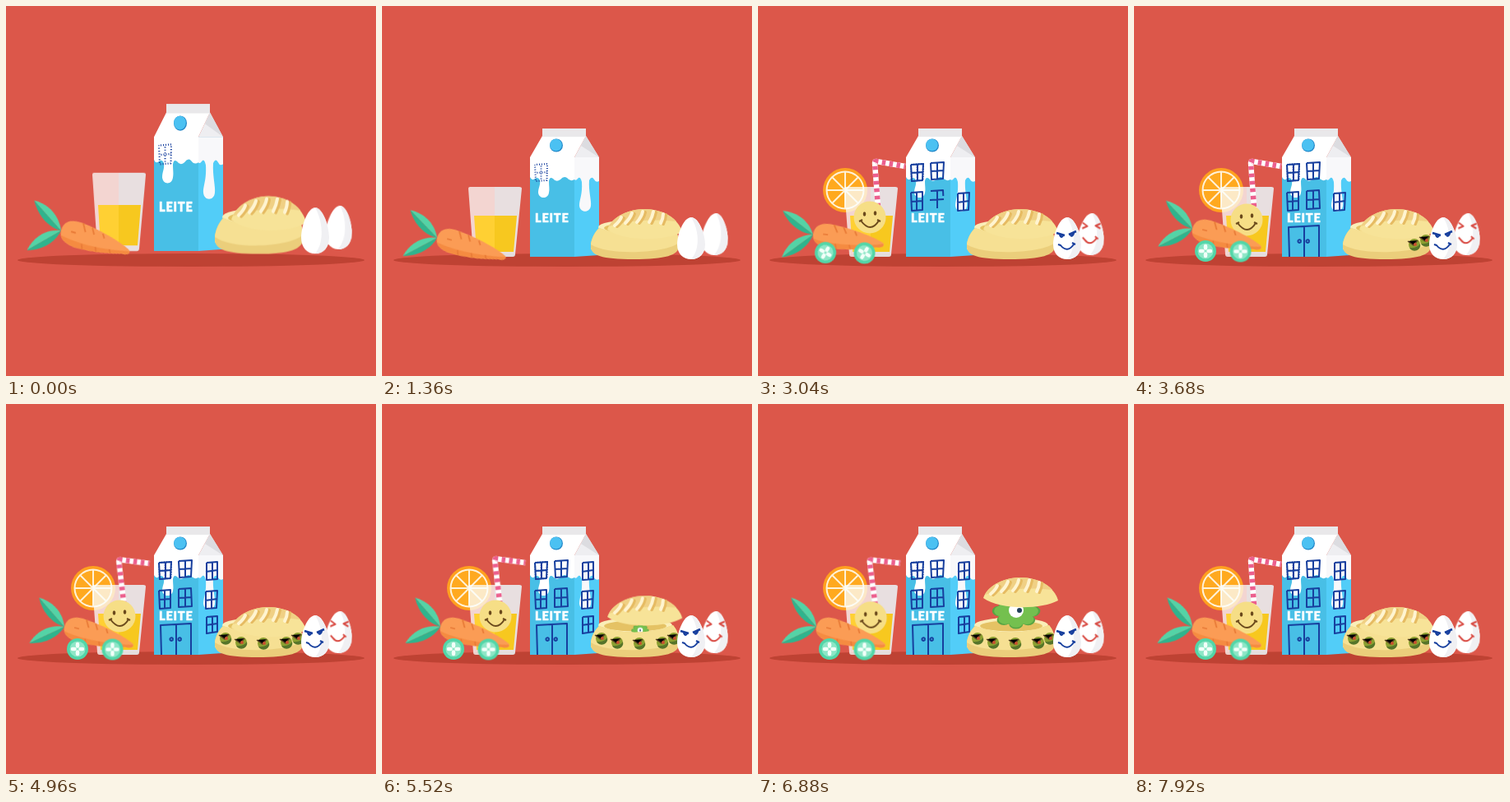
An HTML page that plays this animation: 450 px wide and 450 px high, repeating every 8 s.

```html
<!DOCTYPE html>
<html lang="pt">
<head>
<meta charset="utf-8">
<title>Leite</title>
<style>
html, body { margin: 0; width: 100%; height: 100%; overflow: hidden; background: #dc574a; }
svg { display: block; width: 100vw; height: 100vh; }
text { font: 900 14.5px Lato, sans-serif; letter-spacing: .8px; fill: #fff; stroke: #fff; stroke-width: .4px; }

/* One percent of the loop is 80 ms. */
[class] { animation: 8s ease-in-out infinite; }
.line { fill: none; stroke-width: 2; stroke-linejoin: round; }
.blue { stroke: #173f9e; }
.red { stroke: #d84840; }

.land { animation-name: land; transform-origin: 0 305px; }
@keyframes land {
  0% { transform: translateY(-7px) scaleY(var(--stretch)); }
  2% { transform: scaleY(1.02); }
  3% { transform: scaleY(.95); }
  5% { transform: scaleY(1.02); }
  7%, 100% { transform: none; }
}

.straw { animation-name: straw; transform-origin: 152px 300px; }
@keyframes straw {
  0%, 23% { transform: scaleY(.2); opacity: 0; }
  23.1% { transform: scaleY(.2); opacity: 1; }
  27% { transform: scaleY(1.3); opacity: 1; }
  30% { transform: scaleY(.94); }
  33%, 47% { transform: none; }
  51% { transform: rotate(-1deg) scaleY(1.16); }
  56%, 68% { transform: rotate(-2.5deg); }
  72% { transform: rotate(-2.5deg) scaleY(1.07); }
  77%, 79% { transform: rotate(-2.5deg); }
  83% { transform: rotate(-5deg); }
  88% { transform: rotate(-2.5deg); }
  92% { transform: scaleY(1.12); }
  96%, 100% { transform: none; }
}

.pop { animation-name: pop; }
@keyframes pop {
  0%, 24% { transform: scale(0); }
  28% { transform: scale(1.2); }
  30% { transform: scale(.95); }
  32%, 100% { transform: none; }
}
.smiley { animation-name: smiley; }
@keyframes smiley {
  0%, 38% { transform: translate(136px, 257px); }
  44%, 58% { transform: translate(137px, 260px); }
  62%, 80% { transform: translate(138px, 258px); }
  88%, 100% { transform: translate(137px, 260px); }
}

.carrot { animation-name: carrot; }
@keyframes carrot {
  0%, 23% { transform: translate(67px, 282px) rotate(15deg); }
  27% { transform: translate(67px, 270px) rotate(9deg); }
  31%, 38% { transform: translate(67px, 278px) rotate(7deg); }
  41% { transform: translate(71px, 268px) rotate(16deg); }
  44%, 100% { transform: translate(71px, 271px) rotate(14deg); }
}
.leaves { animation-name: leaves; }
@keyframes leaves {
  0%, 38% { transform: none; }
  42% { transform: rotate(9deg); }
  45% { transform: rotate(1deg); }
  48%, 100% { transform: rotate(4deg); }
}
.wheel { animation-name: wheel; }
@keyframes wheel {
  0%, 38% { transform: translate(var(--from), 2px) rotate(-60deg); }
  43%, 100% { transform: none; }
}

.draw { stroke-dasharray: 1 2; stroke-dashoffset: 1.01; animation-timing-function: linear; }
.d1 { animation-name: d1; }
.d2 { animation-name: d2; }
.d3 { animation-name: d3; }
.d4 { animation-name: d4; }
.d5 { animation-name: d5; }
.d6 { animation-name: d6; }
@keyframes d1 { 0%, 25% { stroke-dashoffset: 1.01; } 31%, 100% { stroke-dashoffset: 0; } }
@keyframes d2 { 0%, 29% { stroke-dashoffset: 1.01; } 35%, 100% { stroke-dashoffset: 0; } }
@keyframes d3 { 0%, 34% { stroke-dashoffset: 1.01; } 39%, 100% { stroke-dashoffset: 0; } }
@keyframes d4 { 0%, 37% { stroke-dashoffset: 1.01; } 42%, 100% { stroke-dashoffset: 0; } }
@keyframes d5 { 0%, 40% { stroke-dashoffset: 1.01; } 46%, 100% { stroke-dashoffset: 0; } }
@keyframes d6 { 0%, 47% { stroke-dashoffset: 1.01; } 57%, 100% { stroke-dashoffset: 0; } }

.egg { animation-name: egg; }
@keyframes egg {
  0%, 23%, 33%, 100% { transform: none; }
  26% { transform: rotate(5deg); }
  30% { transform: rotate(-4deg); }
}
.blink { animation-name: blink; transform-origin: 0 -6px; }
@keyframes blink {
  0%, 70%, 74%, 92%, 96%, 100% { transform: none; }
  72%, 94% { transform: scaleY(.2); }
}

.o1 { animation-name: o1; }
.o2 { animation-name: o2; }
.o3 { animation-name: o3; }
@keyframes o1 { 0%, 42% { transform: scale(0); } 44% { transform: scale(1.25); } 46%, 100% { transform: none; } }
@keyframes o2 { 0%, 47% { transform: scale(0); } 50% { transform: scale(1.25); } 52%, 100% { transform: none; } }
@keyframes o3 { 0%, 52% { transform: scale(0); } 55% { transform: scale(1.25); } 57%, 100% { transform: none; } }

.lid { animation-name: lid; transform-origin: 320px 262px; }
@keyframes lid {
  0%, 67% { transform: none; }
  72% { transform: translateY(-41px) rotate(-3deg); }
  76%, 79% { transform: translateY(-36px); }
  82% { transform: translateY(-32px); }
  85%, 90% { transform: translateY(-36px); }
  95% { transform: translateY(2px); }
  97%, 100% { transform: none; }
}
.monster { animation-name: monster; }
@keyframes monster {
  0%, 67% { transform: translate(314px, 280px) scale(.3); opacity: 0; }
  68% { transform: translate(314px, 278px) scale(.3); opacity: 1; }
  73% { transform: translate(314px, 249px) scale(1.06); }
  76%, 90% { transform: translate(314px, 252px); opacity: 1; }
  95% { transform: translate(314px, 278px) scale(.3); opacity: 1; }
  95.1%, 100% { transform: translate(314px, 280px) scale(.3); opacity: 0; }
}
.pupil { animation-name: pupil; }
@keyframes pupil {
  0%, 79%, 88%, 100% { transform: none; }
  81%, 83% { transform: translateX(-4px); }
  85%, 87% { transform: translateX(4px); }
}
</style>
</head>
<body>
<svg viewBox="0 0 450 450">
  <defs>
    <g id="leaf">
      <path fill="#54d3a6" d="M0 0C-14-10-32-10-47 0Z"/>
      <path fill="#2fb48d" d="M0 0C-14 9-32 8-47 0Z"/>
    </g>
    <g id="eggshape">
      <path fill="#fff" d="M0-26C9-26 17-6 17 7C17 18 10 25 0 25S-17 18-17 7C-17-6-9-26 0-26Z"/>
      <path fill="#f0f0f3" d="M0-26C9-26 17-6 17 7C17 18 10 25 0 25C12 12 9-12 0-26Z"/>
    </g>
    <g id="cucumber">
      <circle r="13" fill="#52d6a8"/>
      <circle r="9.500" fill="#8de6c6"/>
      <path stroke="#f2fff9" stroke-width="4.500" stroke-linecap="round" d="M-6 0H-3.500M6 0H3.500M0-6V-3.500M0 6V3.500"/>
    </g>
    <g id="olive">
      <circle r="7" fill="#8a9f30"/>
      <path fill="#56752a" d="M-6 4A7 7 0 0 0 7-1Q4 5-6 4Z"/>
      <path stroke="#5b4522" stroke-width="1.500" d="M-8-4L-1 1L4-5"/>
      <circle cx="1" cy="0" r="2" fill="#c9512f"/>
    </g>
    <path id="pane" d="M0 1L15 0L14.500 20L1 21ZM7.500 .5V20.500M.5 11L15 10"/>
  </defs>

  <ellipse cx="225" cy="309" rx="211" ry="8" fill="#be4233"/>

  <!-- orange slice and glass -->
  <g transform="translate(106 224)"><g class="pop">
    <circle r="27" fill="#ffa01f"/>
    <circle r="23.500" fill="#fff2d8"/>
    <circle r="21.500" fill="#ffa91f"/>
    <path stroke="#fff2d8" stroke-width="2" d="M0-22V22M-22 0H22M-15.500-15.500L15.500 15.500M15.500-15.500L-15.500 15.500"/>
  </g></g>
  <g class="land" style="--stretch:1.12">
    <path fill="#fbffff" fill-opacity=".75" d="M105 222Q105 220 107 220H137V305H114Q111 305 111 302Z"/>
    <path fill="#ebfcff" fill-opacity=".83" d="M137 220H167Q170 220 170 222L162 302Q162 305 159 305H137Z"/>
    <g class="straw" fill="none" stroke-width="6.500">
      <path stroke="#fff" d="M150 298L142 191Q142 189 144 189L179 195"/>
      <path stroke="#ec5f8e" stroke-dasharray="4.500 4.500" d="M150 298L142 191Q142 189 144 189L179 195"/>
    </g>
    <path fill="#ffd033" d="M112 255H137V299H115Z"/>
    <path fill="#f7c81f" d="M137 255H164L160 299H137Z"/>
    <g class="smiley"><g class="pop">
      <circle r="19.500" fill="#f6de86"/>
      <ellipse cx="-6.500" cy="-4" rx="1.800" ry="2.800" fill="#6b4a1c"/>
      <ellipse cx="6.500" cy="-5" rx="1.800" ry="2.800" fill="#6b4a1c"/>
      <path class="line" stroke="#6b4a1c" d="M-11 4Q1 20 11 4M-13 5L-9 3M9 3L13 5"/>
    </g></g>
  </g>

  <!-- carton -->
  <g class="land" style="--stretch:1.147">
    <path fill="#48bfe6" d="M180 184H234V305H180Z"/>
    <path fill="#52cdf8" d="M234 184H264V303L234 305Z"/>
    <path fill="#fff" d="M180 184L195 158H248L234 184V211Q229 214 225 209Q221 206 217 211Q212 215 208 210Q204 207 203 213C203 219 204 223 203 227C202 235 191 235 190 227C190 221 193 218 192 212Q190 207 186 210Q182 213 180 208Z"/>
    <path fill="#f8f8fa" d="M234 184H264V213Q260 215 258 211Q255 206 252 212C251 225 255 237 254 243C253 252 241 252 240 243C240 235 244 230 243 214Q241 206 238 210Q236 213 234 211Z"/>
    <path fill="#eeeef1" d="M248 158L264 184H234Z"/>
    <path fill="#dcdce0" d="M248 158L264 184L242 170Z"/>
    <path fill="#e9e8ea" d="M195 149H248V159H195Z"/>
    <circle cx="212" cy="169.500" r="8" fill="#2489c9"/>
    <circle cx="211.500" cy="169" r="7.300" fill="#4bc1f2"/>
    <text x="186" y="263">LEITE</text>
    <g class="line blue">
      <g class="draw d1"><use href="#pane" x="186" y="192"/></g>
      <path class="draw d1" pathLength="1" d="M186 193L201 192L200 212L187 213ZM194 193V212M186 203L201 202"/>
      <path class="draw d2" pathLength="1" d="M210 191L226 190L225 210L211 211ZM218 191V210M210 201L226 200"/>
      <path class="draw d3" pathLength="1" d="M186 227L200 226L200 248L187 249ZM193 227V248M186 238L200 237"/>
      <path class="draw d4" pathLength="1" d="M210 225L225 224L226 246L210 247ZM218 225V246M209 236L226 235"/>
      <path class="draw d2" pathLength="1" d="M243 228L257 227L256 248L243 249ZM250 228V248M242 239L257 237"/>
      <path class="draw d5" pathLength="1" d="M189 305L188 269L225 267V305M207 268V305M203 286A1.800 1.800 0 1 0 203 286.100M213 286A1.800 1.800 0 1 0 213 286.100"/>
      <path class="draw d6" pathLength="1" d="M244 193L257 192V213L244 214ZM251 193V213M243 204L257 202"/>
      <path class="draw d6" pathLength="1" d="M244 259L257 258V277L244 279ZM251 259V278M243 269L257 267"/>
    </g>
  </g>

  <!-- carrot car -->
  <g class="land" style="--stretch:1.08">
    <g class="carrot">
      <g class="leaves">
        <use href="#leaf" transform="rotate(31)"/>
        <use href="#leaf" transform="rotate(-43)"/>
      </g>
      <path fill="#fb9c55" d="M0 0C0-12 10-16 22-15C48-13 78-5 86 0C89 3 84 6 78 6C55 12 40 14 20 14C8 13 0 9 0 0Z"/>
      <path fill="#f58b41" d="M1 5C25 10 60 7 86 1C88 4 84 6 78 6C55 12 40 14 20 14C10 13 3 10 1 5Z"/>
      <path fill="none" stroke="#e87a36" stroke-width="1.700" d="M24-15L29-6M36-13L40-6M50-10L53-5M30 14L28 8M47 12L45 7M64 9L62 5M12-2H18"/>
    </g>
  </g>
  <g transform="translate(87 298)"><g class="wheel" style="--from:-5px"><g class="pop"><use href="#cucumber"/></g></g></g>
  <g transform="translate(129.500 298.500)"><g class="wheel" style="--from:0px"><g class="pop"><use href="#cucumber"/></g></g></g>

  <!-- bread -->
  <g class="land" style="--stretch:1.15">
    <path fill="#f6e09a" d="M254 293C254 275 275 259 306 259S361 272 361 290V296H254Z"/>
    <ellipse cx="308" cy="269" rx="45" ry="9" fill="#faeeb8"/>
    <ellipse cx="308" cy="270" rx="38" ry="6.500" fill="#e5c264"/>
    <g class="monster">
      <g transform="scale(1.22 .9)">
        <circle r="19" fill="#74c04f"/>
        <circle r="17" fill="none" stroke="#58a443" stroke-width="14" stroke-linecap="round" stroke-dasharray="0 13.350"/>
        <circle r="15" fill="none" stroke="#74c04f" stroke-width="14" stroke-linecap="round" stroke-dasharray="0 11.780"/>
      </g>
      <circle cy="-1" r="9" fill="#fff"/>
      <circle class="pupil" cy="-1" r="3" fill="#24405c"/>
    </g>
    <path fill="#ebce7b" d="M254 293C254 283 258 276 264 270Q308 286 354 269C360 276 361 283 361 292C361 303 345 308 306 308S254 303 254 293Z"/>
    <path fill="#f6e093" d="M254 290C255 282 259 275 264 270Q308 286 354 269C359 275 361 281 361 288C345 301 275 304 254 290Z"/>
    <g class="lid">
      <path fill="#f7e398" d="M274 272C278 258 298 247 319 247C342 247 361 259 365 275C345 286 295 287 274 272Z"/>
      <path fill="#f0d084" d="M276 268C282 256 300 247 319 247C338 247 351 254 358 262C335 259 300 260 276 268Z"/>
      <g fill="none" stroke-width="4" stroke-linecap="round">
        <path stroke="#e6bb62" d="M286 268Q292 263 294 258M299 265Q305 259 307 253M313 264Q319 257 320 251M328 264Q332 257 333 251M342 265Q345 259 345 254"/>
        <path stroke="#fff4d0" d="M283 267Q289 262 291 257M296 264Q302 258 304 252M310 263Q316 256 317 250M325 263Q329 256 330 250M339 264Q342 258 342 253"/>
      </g>
    </g>
    <g transform="translate(267 285)"><g class="o3"><use href="#olive"/></g></g>
    <g transform="translate(286 290)"><g class="o3"><use href="#olive"/></g></g>
    <g transform="translate(313 291)"><g class="o2"><use href="#olive"/></g></g>
    <g transform="translate(341 290)"><g class="o1"><use href="#olive"/></g></g>
    <g transform="translate(355 285)"><g class="o1"><use href="#olive"/></g></g>
  </g>

  <!-- eggs -->
  <g class="land" style="--stretch:1.04">
    <g transform="translate(405 278) rotate(3)"><g class="egg">
      <use href="#eggshape" transform="scale(.94 1)"/>
      <g class="line red">
        <g class="blink"><path class="draw d1" pathLength="1" d="M-11-14L-5-10L-11-7M11-14L5-11L11-8"/></g>
        <path class="draw d2" pathLength="1" d="M-10 4L-7 7Q0 15 7 4M5 2L9 5"/>
      </g>
    </g></g>
  </g>
  <g class="land" style="--stretch:1.1">
    <g transform="translate(376 283)"><g class="egg">
      <use href="#eggshape"/>
      <g class="line blue">
        <g class="blink"><path class="draw d1" pathLength="1" stroke-width="2.500" d="M-13-7L-3-4M2-5L11-9M-9-5Q-7 0-5-4M4-5Q6-1 8-7"/></g>
        <path class="draw d2" pathLength="1" d="M-11 7L-8 8Q0 18 8 7M6 5L10 7"/>
      </g>
    </g></g>
  </g>
</svg>
</body>
</html>
```
